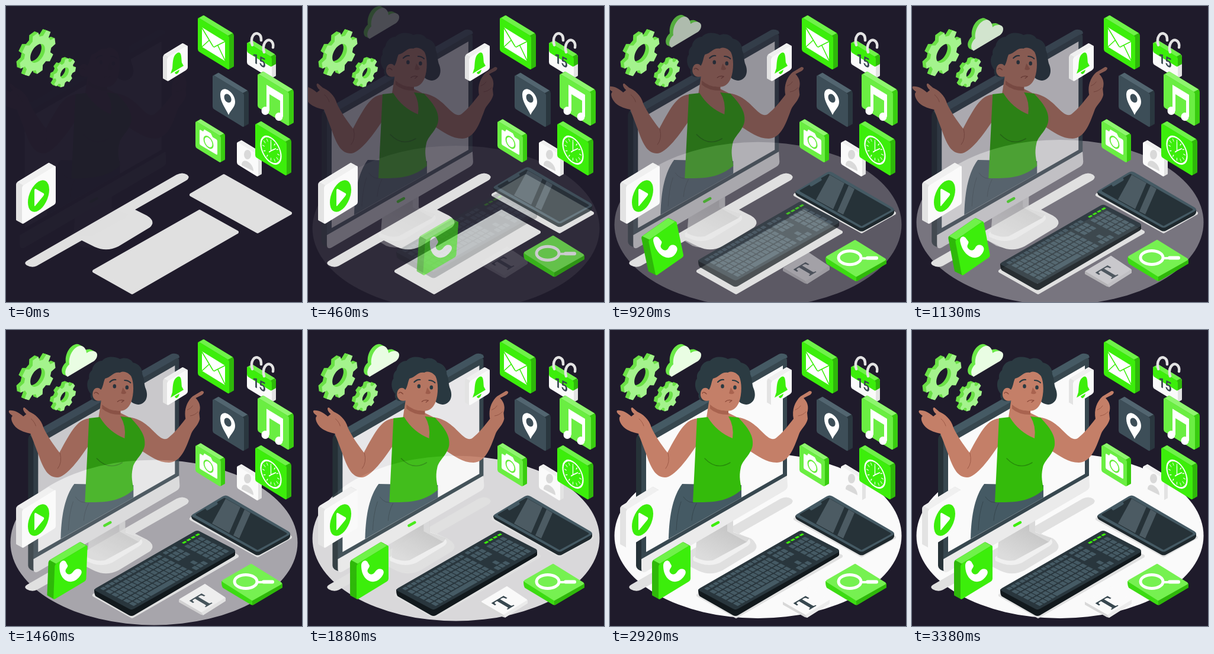
An HTML page for the animation above (3.43 s loop, 500x500 px).

```html
<!DOCTYPE html>
<html lang="en">
<head>
<meta charset="utf-8">
<title>Isometric video call</title>
<style>
html, body { margin: 0; height: 100%; overflow: hidden; background: #1f1b2b; }
svg { display: block; width: 100vw; height: 100vh; }
text { text-anchor: middle; fill: #37474f; font-weight: 700; }
.line { fill: none; stroke-linecap: round; stroke-linejoin: round; }
</style>
</head>
<body>
<svg viewBox="0 0 500 500">
  <defs>
    <linearGradient id="neckShade" x1="1" y1="0" x2=".3" y2="1"><stop offset="0" stop-color="#bdbdbd"/><stop offset="1" stop-color="#dcdcdc"/></linearGradient>
  </defs>
  <ellipse id="floor" cx="250" cy="347.5" rx="242.5" ry="139.5" fill="#fafafa"/>

  <g fill="#e0e0e0" stroke="#e0e0e0" stroke-linejoin="round">
    <path d="M36 430 288 285Q298 280 306 285 312 290 304 295L218 344 238 354Q254 364 243 374L190 406Q170 416 150 407L128 396 52 439Q44 443 35 438 29 434 36 430Z" stroke="none"/>
    <path d="M313 319 368 287 480 350 425 381Z" stroke-width="6"/>
    <path d="M149 448 327 347 390 382 213 484Z" stroke-width="6"/>
  </g>

  <g id="monitor">
    <path d="M138 386 208 341 238 352Q252 362 240 372L188 403Q170 412 153 405L140 397Z" fill="#e0e0e0"/>
    <path d="M140 384 208 341 232 351Q242 358 232 365L186 393Q170 400 154 395L141 390Z" fill="#f0f0f0"/>
    <path d="M146 358 208 322V342L235 352 231 358 174 389Q160 392 144 384Z" fill="url(#neckShade)"/>
    <path d="M208 322V342L235 352 231 358 198 340V328Z" fill="#dadada"/>
    <path d="M44 185Q44 179 50 175L285 41Q291 38 299 42L299 60 56 200V408Q44 405 44 398Z" fill="#263238"/>
    <path d="M47 177 285 41Q291 38 298 42L300 46 54 187Z" fill="#455a64"/>
    <path d="M53 192Q53 187 57 185L293 49Q299 46 299 52V248L53 389Z" fill="#37474f"/>
    <path d="M61 193 292 60V243L61 375Z" fill="#fafafa"/>
    <path d="M53 387 299 246 300 263Q300 269 294 272L61 408Q53 412 53 403Z" fill="#ebebeb"/>
    <path d="M173 330.500 183 325" class="line" stroke="#3cee0b" stroke-width="4.500"/>

    <path d="M122 260C107 280 100 310 99 353L222 283V262Z" fill="#455a64"/>
    <path d="M124 282Q133 295 146 290M120 290Q113 310 112 338M146 293Q139 306 138 322" class="line" stroke="#37474f"/>

    <g fill="#c47f68">
      <path d="M150 149C128 150 118 168 97 207 86 193 76 178 70 165 66 150 55 142 46 138L38 131C34 130 35 137 41 142L36 146C28 139 20 135 12 136 10 139 14 142 18 145 13 148 17 158 23 164 31 171 40 173 48 175L62 212C70 235 78 249 93 249 108 249 131 219 152 186Z"/>
      <path d="M212 147C235 149 248 163 260 175 268 183 275 187 281 182 291 174 300 163 310 150 307 135 312 121 322 112L337 103C343 103 341 108 337 110L327 115C334 122 336 130 333 140L334 150C332 160 324 166 320 174 312 195 304 223 282 224 264 224 250 213 234 203Z"/>
      <path d="M168 115 163 148 182 174 208 187 214 147 200 140V130Z"/>
    </g>
    <path d="M169 126Q182 138 200 136L200 143Q180 143 169 133Z" fill="#a9634f"/>
    <path d="M98 208Q102 224 94 234M49 150Q55 155 57 162M313 135Q319 133 322 128M318 145Q326 144 331 138" class="line" stroke="#9f5b48"/>

    <path d="M147 149 165 147Q180 172 207 183 210 162 200 146L217 148C229 161 243 176 241 194 239 210 224 219 221 232 217 249 221 258 222 270 196 292 170 291 140 291 121 267L124 256 136 240 135 225 132 211 150 188 147 149Z" fill="#34bb0b"/>
    <path d="M160 217Q180 238 203 224" class="line" stroke="#278d0a" stroke-width="1.500"/>

    <path d="M168 118C156 124 147 117 150 108 143 101 142 88 147 82 146 73 150 70 152 68 154 56 163 52 169 52 177 43 192 45 199 49 208 45 218 49 221 55 231 57 237 64 237 75 241 82 239 91 243 100 248 114 242 125 230 126 222 125 216 121 214 115Z" fill="#2b3b42"/>
    <path d="M174 82C184 80 188 70 199 72 207 68 214 73 218 78 223 88 223 108 218 122 212 136 203 138 192 136 179 134 171 127 168 119 158 122 152 115 153 107 154 97 163 95 167 101 171 96 171 88 174 82Z" fill="#c47f68"/>
    <path d="M204 97 210 106Q207 110 201 107Z" fill="#a9634f"/>
    <g class="line" stroke="#2b3b42" stroke-width="2.200">
      <path d="M182 88Q187 83 192 84M207 85Q213 85 217 89"/>
      <path d="M156 107Q158 103 163 108M195 121Q199 117 206 119L202 122" stroke="#8c4a3a" stroke-width="1.300"/>
    </g>
    <g fill="#2b3b42"><ellipse cx="190" cy="95" rx="2.800" ry="3.600"/><ellipse cx="211" cy="97" rx="2.800" ry="3.600"/></g>
  </g>

  <g id="cloud">
    <path id="puff" d="M104 79C98 76 99 65 107 58 105 44 114 29 124 27 131 25 136 33 136 39 144 33 154 35 154 42 154 48 150 52 146 54Z" fill="#6be948" transform="translate(-6 -3)"/>
    <use href="#puff" transform="translate(3 1.500)"/>
    <path d="M104 79C98 76 99 65 107 58 105 44 114 29 124 27 131 25 136 33 136 39 144 33 154 35 154 42 154 48 150 52 146 54Z" fill="#e9fde3"/>
  </g>

  <g id="keyboard">
    <path d="M149 438 212 472 387 373V380Q386 382 384 383L216 482Q212 484 208 482L152 450Q149 448 149 438Z" fill="#12191d"/>
    <path d="M152 436 319 340Q323 338 327 340L385 370Q389 373 385 376L216 471Q212 473 208 471L152 441Q147 439 152 436Z" fill="#29363d"/>
    <g id="keys" transform="matrix(1.73 -.99 1.78 .917 150 438)" fill="#455a64"></g>
  </g>

  <g id="phone">
    <path d="M313 314 371 282 480 344V349Q479 352 476 354L430 379Q425 382 420 379L317 321Q313 319 313 314Z" fill="#1f292e"/>
    <path d="M316 311 366 281Q371 278 376 281L477 340Q483 344 477 347L430 373Q425 376 420 373L316 316Q311 314 316 311Z" fill="#455a64"/>
    <path d="M322 312 369 285 473 344 425 370Z" fill="#263238" stroke="#263238" stroke-width="3" stroke-linejoin="round"/>
    <path d="M371 285 396 299 377 343 348 327ZM403 303 413 309 394 352 384 347Z" fill="#4c5b63"/>
    <path d="M340 302 355 293" class="line" stroke="#455a64" stroke-width="5"/>
  </g>

  <g id="letter">
    <path d="M292 459 329 480 371 456V462L333 486 329 485 292 464Z" fill="#d8d8d8"/>
    <path d="M329 480 371 456V462L333 486Z" fill="#ececec"/>
    <path d="M294 459 336 434 369 456 330 480Z" fill="#fafafa" stroke="#fafafa" stroke-width="2" stroke-linejoin="round"/>
    <text transform="matrix(.92 -.55 .9 .53 343 469)" font-size="36" font-family="'Noto Serif', 'Liberation Serif', serif">T</text>
  </g>

  <g id="search">
    <path d="M364 424 416 456 467 428V435L420 463Q416 466 412 463L367 436Q364 434 364 424Z" fill="#3cdb12"/>
    <path d="M416 456 467 428V435L420 463 416 465Z" fill="#2fb80a"/>
    <path d="M367 424 414 397 464 428 416 455Z" fill="#76f151" stroke="#76f151" stroke-width="4" stroke-linejoin="round"/>
    <g class="line" stroke="#fff"><ellipse cx="405" cy="425" rx="19" ry="11.500" stroke-width="5"/><path d="M424 426H434" stroke-width="4"/><path d="M435 425.500H450" stroke-width="6"/></g>
  </g>

  <g id="blocks"></g>

  <g fill="#fff">
    <path d="M331 36 370 60V93L331 69Z"/>
    <path d="M331 37 349 67Q351 71 354 68L370 60M331 69 343 58M370 92 358 67" class="line" stroke="#3cee0b" stroke-width="1.600"/>
    <path fill-rule="evenodd" d="M376 184C370 171 362 162 362 150 362 141 368 138 375 142 382 146 387 154 387 162 387 171 380 175 376 184ZM375 149C366 146 367 161 375 163 383 165 382 152 375 149Z"/>
    <path d="M440 133 468 150V187H463V160L445 149V177H440Z"/>
    <ellipse cx="438" cy="177" rx="6.500" ry="7"/><ellipse cx="461" cy="187" rx="6.500" ry="7"/>
    <g transform="matrix(1 .6 0 1.170 342 229)">
      <path d="M-13 -10H-9L-7 -14H4L7 -10H13Q15 -10 15 -8V10Q15 12 13 12H-13Q-15 12 -15 10V-8Q-15 -10 -13 -10Z"/>
      <circle cy="1" r="7.500" fill="none" stroke="#66ee3c" stroke-width="2"/>
    </g>
    <g fill="#d9d9d9"><ellipse cx="408" cy="251" rx="6" ry="8"/><path d="M398 269C398 254 418 264 418 279Z"/></g>
    <g id="clock" class="line" stroke="#fff" transform="matrix(1 .6 0 1.220 447.500 243.500)">
      <circle r="17" stroke-width="2.200"/><path d="M0 -11V1L8 -6M0 1 -3 4" stroke-width="1.300"/>
    </g>
    <g transform="matrix(1 -.6 0 1.170 55 321)">
      <ellipse rx="18" ry="21" fill="#3cee0b"/><path d="M-7 -12Q-7 -14 -5 -13L9 1Q10 3 8 4L-5 11Q-7 12 -7 10Z"/>
    </g>
    <path transform="matrix(1 -.6 0 1.170 289 97)" fill="#3cee0b" d="M0 -15C-8 -15 -7 -4 -8 3L-11 9H11L8 3C7 -4 8 -15 0 -15ZM-4 11H4Q3 15 0 15T-4 11Z"/>
    <path d="M416 66C412 52 420 44 426 47 431 49 431 54 431 58M436 78C432 65 440 55 446 58 451 60 452 66 451 70" class="line" stroke="#e3e3e3" stroke-width="4.500"/>
    <text transform="matrix(1 .5 0 1.170 427.500 100)" font-size="19.500" font-family="Roboto, Inter, sans-serif">15</text>
  </g>

  <g id="call">
    <g id="callBlock"></g>
    <path d="M90 398C90 391 96 387 100 391L104 398C104 402 99 404 101 409 105 415 110 413 113 409 116 404 121 402 126 405 129 408 128 412 125 416 112 434 90 424 90 398Z" fill="#fff"/>
  </g>
</svg>
<script>
const $ = id => document.getElementById(id);
const rect = (x, y, w, h, extra = '') => `<rect x="${x}" y="${y}" width="${w}" height="${h}" ${extra}/>`;
const green = ['#3cee0b', '#2fb80a', '#6ff249'];
const lightGreen = ['#6aee42', '#39cc10', '#8ff56f'];
const white = ['#fafafa', '#e3e3e3', '#f0f0f0'];
const slate = ['#3d4e58', '#2a373f', '#526570'];

// Upright isometric slab: slope 1 falls to the right, -1 rises.
function block(x, y, w, h, depth, slope, [face, side, top]) {
  const k = .61 * slope, lift = -.55;
  const slab = (i, fill) => rect(0, 0, w, h,
    `rx="3" fill="${fill}" transform="matrix(1 ${k} 0 1 ${x + i * slope} ${y + i * lift})"`);
  let out = '';
  for (let i = depth; i > 0; i--) out += slab(i, side);
  const dx = depth * slope, dy = depth * lift, a = 2, b = w - 2;
  return out + `<path fill="${top}" d="M${x + a} ${y + a * k}l${dx} ${dy} ${b - a} ${(b - a) * k} ${-dx} ${-dy}Z"/>` + slab(0, face);
}

function gear(x, y, r, hole, phase) {
  let d = '';
  for (let i = 0; i < 8; i++)
    for (const [turn, size] of [[-15, .77], [-9, 1], [9, 1], [15, .77]]) {
      const a = (phase + i * 45 + turn) * Math.PI / 180;
      d += (d ? 'L' : 'M') + (r * size * Math.cos(a)).toFixed(1) + ' ' + (r * size * Math.sin(a)).toFixed(1);
    }
  d += `ZM${hole} 0A${hole} ${hole} 0 1 0 ${-hole} 0A${hole} ${hole} 0 1 0 ${hole} 0Z`;
  let out = '';
  for (let i = 6; i >= 0; i--)
    out += `<path fill-rule="evenodd" d="${d}" fill="${i ? '#6be146' : '#a4f38d'}" transform="matrix(.8 -.46 0 .92 ${x - i} ${y - i * .4})"/>`;
  return out;
}

$('blocks').innerHTML =
  gear(53.500, 80, 37.500, 15.500, -7) + gear(99, 113, 24, 9, 12) +
  block(324, 19, 53, 57, 8, 1, green) +
  block(407, 61, 42, 37, 7, 1, white) +
  block(407, 61, 42, 17, 7, 1, green) +
  block(349, 116, 53, 57, 8, 1, slate) +
  block(425, 114, 53, 57, 8, 1, lightGreen) +
  block(320, 194, 43, 45, 7, 1, lightGreen) +
  block(390, 229, 36, 38, 6, 1, white) +
  block(421, 198, 53, 57, 8, 1, green) +
  block(27, 304, 57, 65, 10, -1, white) +
  block(272, 87, 35, 41, 7, -1, white);
$('callBlock').innerHTML = block(82, 396, 54, 60, 11, -1, green);

for (let i = 0; i < 12; i++)
  $('clock').innerHTML += `<path d="M0 -14V-11" transform="rotate(${i * 30})"/>`;

let keys = '';
for (let row = 0; row < 6; row++) {
  const y = row ? 1.500 + row * 5.600 : 2, h = row ? 4.500 : 3.200;
  const key = (x, w = 3.400) => keys += rect(x, y, w, h, 'rx=".5"');
  for (let col = 0; col < 14; col++)
    if (row < 5 || col < 4 || col > 9) key(3 + col * 4.200);
  if (row == 5) key(19.800, 24.400);
  for (let col = 0; col < 3; col++)
    if (row < 3 || row == 5 || (row == 4 && col == 1)) key(64 + col * 4.200);
  for (let col = 0; col < 4; col++)
    row ? key(80 + col * 4.300) : keys += rect(82 + col * 4.300, 2.800, 3.200, 1.900, 'fill="#3cee0b"');
}
$('keys').innerHTML = keys;

function bezier(x1, y1, x2, y2) {
  const at = (a, b, s) => 3 * a * s * (1 - s) ** 2 + 3 * b * s * s * (1 - s) + s ** 3;
  return x => {
    if (x <= 0) return 0;
    if (x >= 1) return 1;
    let lo = 0, hi = 1;
    for (let i = 0; i < 24; i++) {
      const mid = (lo + hi) / 2;
      at(x1, x2, mid) < x ? lo = mid : hi = mid;
    }
    return at(y1, y2, lo);
  };
}
const easeInOut = bezier(.42, 0, .58, 1);
const easeOut = bezier(0, 0, .58, 1);
const overshoot = bezier(.36, -.01, .5, 1.38);

// id, start offset x and y, duration, easing
const slides = [
  ['floor', 0, 30, 2600, easeInOut],
  ['monitor', -30, 0, 2500, easeOut],
  ['cloud', 0, -30, 1500, easeInOut],
  ['keyboard', 0, -30, 1500, easeInOut],
  ['letter', 0, -30, 2000, easeInOut],
  ['phone', 0, -30, 950, overshoot],
  ['search', 0, -30, 950, overshoot],
];

function place(id, transform, opacity) {
  $(id).setAttribute('transform', transform);
  $(id).setAttribute('opacity', Math.max(0, Math.min(1, opacity)));
}

function drawCall(t) {
  const stops = [[0, -20], [1200, 10], [1600, -2], [2000, 0]];
  let i = 0;
  while (i < 2 && t > stops[i + 1][0]) i++;
  const [t0, a] = stops[i], [t1, b] = stops[i + 1];
  const p = overshoot((t - t0) / (t1 - t0));
  const x = i ? 0 : 250 * (1 - p);
  place('call', `translate(${103.5 + x} 407) skewX(${a + (b - a) * p}) translate(-103.5 -407)`, i ? 1 : p);
}

const start = performance.now();
function draw() {
  const t = (performance.now() - start) % 3430 + 20;
  for (const [id, x, y, duration, ease] of slides) {
    const p = ease(t / duration);
    place(id, `translate(${x * (1 - p)} ${y * (1 - p)})`, p);
  }
  drawCall(t);
  requestAnimationFrame(draw);
}
draw();
</script>
</body>
</html>
```
